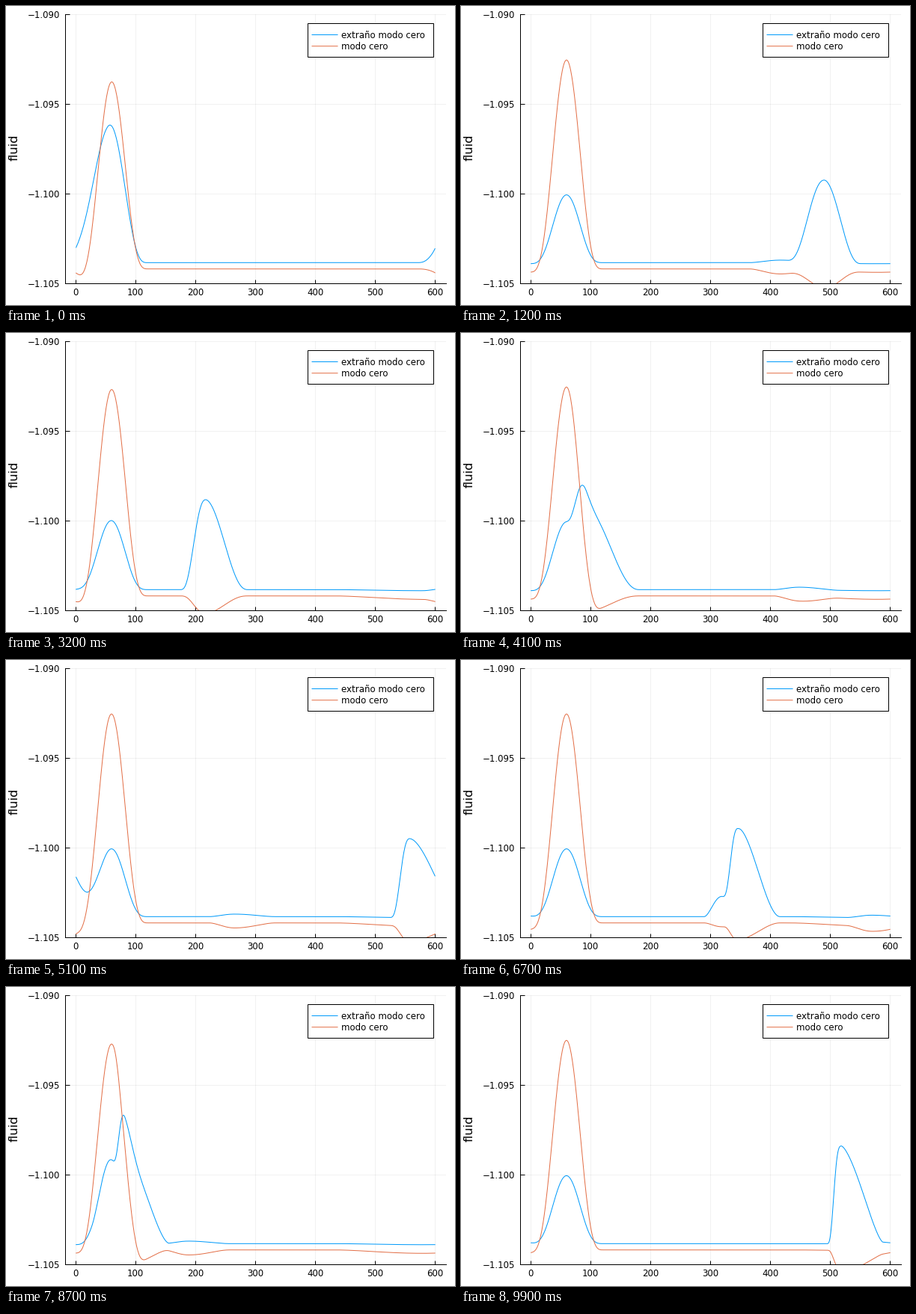
A matplotlib script for the animation above (10000 ms loop, 600 by 400 pixels).

```python
import numpy as np
import matplotlib.pyplot as plt
from matplotlib.animation import FuncAnimation
from matplotlib.patches import Rectangle

W, H, DPI = 600, 400, 100
FRAMES, INTERVAL = 100, 100
PT = 72 / DPI  # points per pixel
BLUE, RED = "#009AFA", "#E36F47"
FONT = 11.8 * PT
LINE = PT

plt.rcParams["font.family"] = "DejaVu Sans"

x = np.arange(1, 601)


def side(d, half, n, p):
    """Flank falling from 1 to 0, with value 1/2 at distance half."""
    width = half / (1 - .5 ** (1 / p)) ** (1 / n)
    u = np.clip(np.abs(d) / width, 0, 1)
    return (1 - u ** n) ** p


def bump(center, left, right, n=(2, 2), p=(2, 2)):
    d = (x - center + 300) % 600 - 300
    return np.where(d < 0, side(d, left, n[0], p[0]),
                    side(d, right, n[1], p[1]))


STANDING = bump(60, 24.7, 24.7, p=(4, 4))
HOLLOW = bump(580, 81, 60)


def travelling(t):
    """Leftward pulse that steepens in front and keeps its area."""
    k = t / (FRAMES - 1)
    pos = np.interp(t, [0, 51, 87, 99], [654, -42, -514, -681])
    amp = np.interp(t, [0, 24, 46, 67, 87, 99], [38, 54.5, 42.5, 49, 49, 54.5])
    foot = 13 * max(0, np.sin(np.pi * (t - 51) / 48))
    front = 12 + 26 * np.exp(-t / 28)
    back = (2640 - 30 * foot) / amp - front
    pulse = amp * bump(pos, front, back,
                       n=(2 + k, 2 - .5 * k), p=(3 + 2 * k, 3 - 1.5 * k))
    return pulse + foot * bump(pos - 29, 16, 16)


def curves(t):
    pulse = travelling(t)
    skew = 7 * min(t / 50, 1)
    ripple = bump(np.interp(t, [0, 41, 67, 99], [652, -150, -630, -1240]),
                  30 - skew, 30 + skew)
    hollow = np.interp(t, [0, 11, 87, 99], [0, 1, 1, .2]) * HOLLOW
    ratio = .19 + .08 * np.exp(-t / 10)

    blue = -11038.3 + 37.9 * STANDING + pulse + 1.4 * ripple - .6 * hollow
    red = (-11041.8 + 116.9 * STANDING - ratio * pulse
           - 2.8 * ripple - 1.9 * hollow)
    return blue / 1e4, red / 1e4


fig = plt.figure(figsize=(W / DPI, H / DPI), dpi=DPI, facecolor="white")

L, R, T, B = 79.3, 587.6, 11.4, 371.4
ax = fig.add_axes([L / W, 1 - B / H, (R - L) / W, (B - T) / H])
ax.set(xlim=(-16.97, 617.97), ylim=(-1.105, -1.090))
ax.set_xticks(range(0, 601, 100))
yticks = [-1.105, -1.100, -1.095, -1.090]
ax.set_yticks(yticks, [f"\u2212{-v:.3f}" for v in yticks])
ax.tick_params(direction="in", length=5.5 * PT, width=PT, labelsize=FONT)
ax.tick_params(axis="x", pad=5.5 * PT)
ax.tick_params(axis="y", pad=7.2 * PT)
ax.spines[["top", "right"]].set_visible(False)
ax.spines[["left", "bottom"]].set_linewidth(PT)
ax.grid(color="black", alpha=.1, linewidth=.4)
ax.set_axisbelow(True)

line_blue, = ax.plot([], [], color=BLUE, lw=LINE)
line_red, = ax.plot([], [], color=RED, lw=LINE)

# Pixel-space layer for the label and the legend
top = fig.add_axes([0, 0, 1, 1])
top.set(xlim=(0, W), ylim=(H, 0))
top.axis("off")
top.text(11.5, 189.5, "fluid", rotation=90, ha="center", va="center",
         fontsize=16.3 * PT)
top.add_patch(Rectangle((403, 22.9), 168, 45.3, facecolor="white",
                        edgecolor="black", lw=PT))
for y, color, name in [(38.5, BLUE, "extraño modo cero"),
                       (53.7, RED, "modo cero")]:
    top.plot([409, 443], [y, y], color=color, lw=LINE, snap=False)
    top.text(448, y + 4.5, name, fontsize=FONT, va="baseline")


def update(i):
    blue, red = curves(i)
    line_blue.set_data(x, blue)
    line_red.set_data(x, red)
    return line_blue, line_red


anim = FuncAnimation(fig, update, frames=FRAMES, interval=INTERVAL,
                     repeat=True, repeat_delay=0)
plt.show()
```
